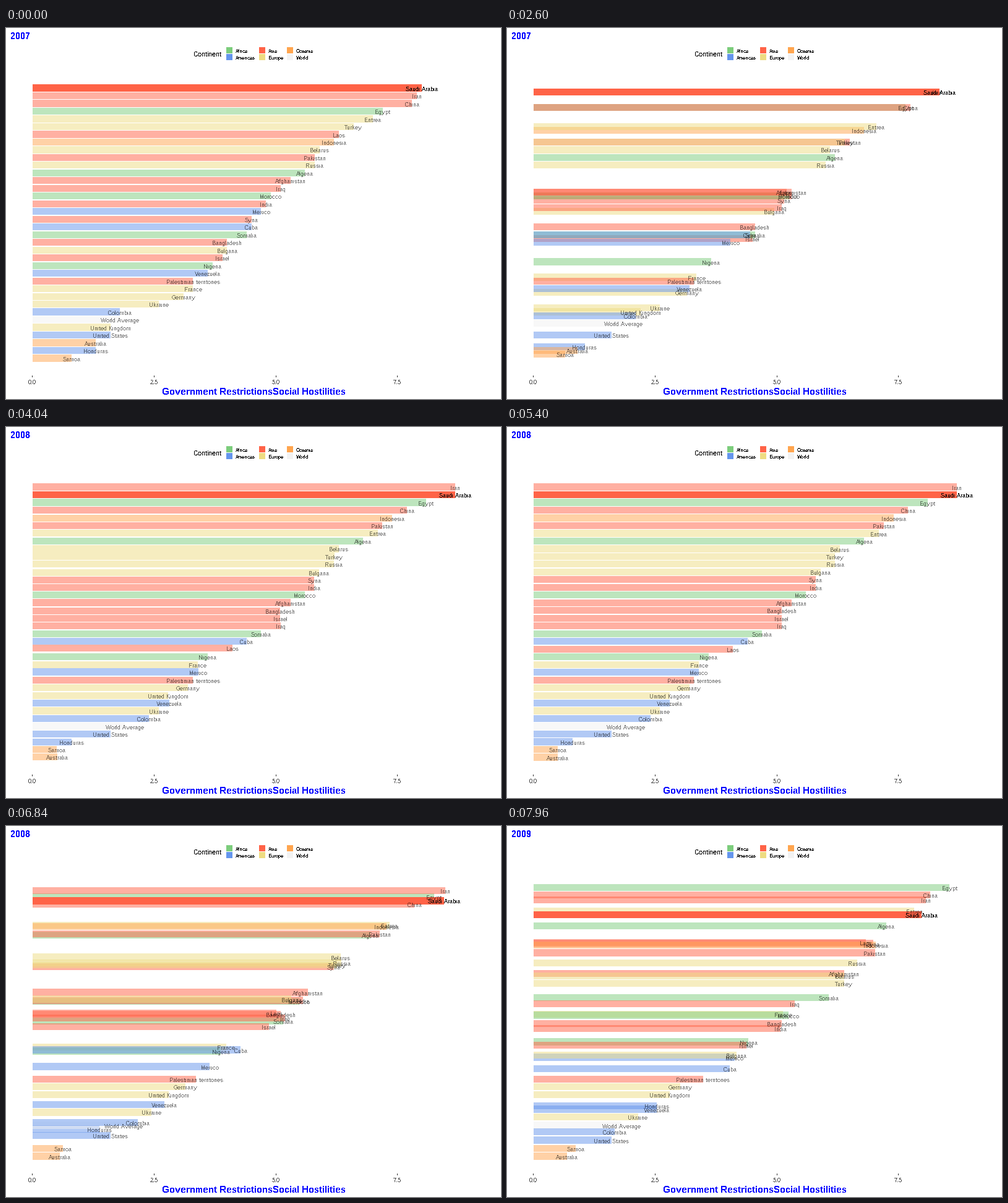
These frames come from a looping animation (800 by 600 pixels, 8 s). A matplotlib script:

```python
import matplotlib.pyplot as plt
from matplotlib.animation import FuncAnimation
from matplotlib.patches import Rectangle

plt.rcParams["font.family"] = "Liberation Sans"
plt.rcParams["text.hinting"] = "native"
plt.rcParams["text.hinting_factor"] = 1

W, H, FRAMES, STEP_MS = 800, 600, 200, 40
X0, UNIT = 43, 78.6          # value axis
Y1, ROW, BAR = 97, 12.486, 0.9  # rank axis
TWEEN = 95                   # length of a transition, in frames
MIDS = (65, 178.25)          # middle of each transition
FOCUS = "Saudi Arabia"

COLORS = {
    "Africa": "#7CCD7C", "Americas": "#6495ED", "Asia": "#FF6347",
    "Europe": "#EEDC82", "Oceania": "#FFA54F", "World": "#F2F2F2",
}

MEMBERS = {
    "Africa": "Egypt Algeria Morocco Somalia Nigeria",
    "Americas": "Mexico Cuba Venezuela Colombia United_States Honduras",
    "Asia": "Saudi_Arabia Iran China Laos Pakistan Afghanistan Iraq India "
            "Syria Bangladesh Israel Palestinian_territories",
    "Europe": "Eritrea Turkey Belarus Russia Bulgaria France Germany "
              "Ukraine United_Kingdom",
    "Oceania": "Indonesia Australia Samoa",
    "World": "World_Average",
}

# each year is listed in rank order
YEARS = {
    2007: {
        "Saudi Arabia": 8.0, "Iran": 7.9, "China": 7.8, "Egypt": 7.2,
        "Eritrea": 7.0, "Turkey": 6.6, "Laos": 6.3, "Indonesia": 6.2,
        "Belarus": 5.9, "Pakistan": 5.8, "Russia": 5.8, "Algeria": 5.6,
        "Afghanistan": 5.3, "Iraq": 5.1, "Morocco": 4.9, "India": 4.8,
        "Mexico": 4.7, "Syria": 4.5, "Cuba": 4.5, "Somalia": 4.4,
        "Bangladesh": 4.0, "Bulgaria": 4.0, "Israel": 3.9, "Nigeria": 3.7,
        "Venezuela": 3.6, "Palestinian territories": 3.3, "France": 3.3,
        "Germany": 3.1, "Ukraine": 2.6, "Colombia": 1.8,
        "World Average": 1.8, "United Kingdom": 1.6, "United States": 1.6,
        "Australia": 1.3, "Honduras": 1.3, "Samoa": 0.8,
    },
    2008: {
        "Iran": 8.7, "Saudi Arabia": 8.7, "Egypt": 8.1, "China": 7.7,
        "Indonesia": 7.4, "Pakistan": 7.2, "Eritrea": 7.1, "Algeria": 6.8,
        "Belarus": 6.3, "Turkey": 6.2, "Russia": 6.2, "Bulgaria": 5.9,
        "Syria": 5.8, "India": 5.8, "Morocco": 5.6, "Afghanistan": 5.3,
        "Bangladesh": 5.1, "Israel": 5.1, "Iraq": 5.1, "Somalia": 4.7,
        "Cuba": 4.4, "Laos": 4.1, "Nigeria": 3.6, "France": 3.4,
        "Mexico": 3.4, "Palestinian territories": 3.3, "Germany": 3.2,
        "United Kingdom": 2.8, "Venezuela": 2.8, "Ukraine": 2.6,
        "Colombia": 2.4, "World Average": 1.9, "United States": 1.6,
        "Honduras": 0.8, "Samoa": 0.5, "Australia": 0.5,
    },
    2009: {
        "Egypt": 8.6, "China": 8.2, "Iran": 8.0, "Eritrea": 7.9,
        "Saudi Arabia": 7.9, "Algeria": 7.3, "Laos": 7.1, "Syria": 7.1,
        "Indonesia": 7.0, "Pakistan": 7.0, "Russia": 6.7,
        "Afghanistan": 6.5, "Belarus": 6.4, "Turkey": 6.4, "Somalia": 6.2,
        "Iraq": 5.4, "France": 5.3, "Morocco": 5.2, "Bangladesh": 5.1,
        "India": 5.0, "Nigeria": 4.5, "Israel": 4.3, "Mexico": 4.2,
        "Bulgaria": 4.0, "Cuba": 4.0, "Palestinian territories": 3.5,
        "Germany": 3.0, "United Kingdom": 2.8, "Honduras": 2.7,
        "Venezuela": 2.5, "Ukraine": 2.1, "World Average": 1.8,
        "Colombia": 1.6, "United States": 1.6, "Samoa": 0.9,
        "Australia": 0.7,
    },
}
RANKS = {y: {n: i for i, n in enumerate(d)} for y, d in YEARS.items()}

fig = plt.figure(figsize=(W / 100, H / 100), dpi=100, facecolor="white")
ax = fig.add_axes([0, 0, 1, 1])
ax.set_xlim(0, W)
ax.set_ylim(H, 0)
ax.axis("off")


def text(x, y, s, px, ha="left", **kw):
    """Text on baseline y with its size in pixels."""
    return ax.text(x, y, s, fontsize=px * 0.72, ha=ha, va="baseline",
                   antialiased=False, **kw)


def rect(x, y, w, h, color, **kw):
    patch = Rectangle((x, y), w, h, facecolor=color, linewidth=0,
                      antialiased=False, **kw)
    return ax.add_patch(patch)


def cubic_in_out(p):
    p = min(max(p, 0), 1)
    return 4 * p ** 3 if p < 0.5 else 1 - 4 * (1 - p) ** 3


title = text(7, 18, "2007", 15, color="blue", weight="bold")
text(400.5, 593, "Government RestrictionsSocial Hostilities", 15, "center",
     color="blue", weight="bold")

text(304, 46, "Continent", 11, color="black")
for i, (name, color) in enumerate(COLORS.items()):
    x, y = (356, 409, 454)[i // 2], 31 + 11 * (i % 2)
    rect(x, y, 10, 10, color)
    text(x + 15, y + 9, name, 8, color="black")

for i in range(4):
    x = round(X0 + 2.5 * i * UNIT - 0.5)
    rect(x, 562, 1, 3, "#333333")
    text(x, 576, f"{2.5 * i:.1f}", 9, "center", color="#4D4D4D")

bars, labels = {}, {}
for continent, members in MEMBERS.items():
    for name in members.replace(" ", ",").replace("_", " ").split(","):
        alpha = 1 if name == FOCUS else 0.5
        bars[name] = rect(X0, 0, 1, 1, COLORS[continent], alpha=alpha)
        labels[name] = text(0, 0, name, 9, "center", color="black",
                            alpha=alpha)


def update(frame):
    k = 0 if frame < sum(MIDS) / 2 else 1
    a, b = 2007 + k, 2008 + k
    p = 0.5 + (frame - MIDS[k]) / TWEEN
    e = cubic_in_out(p)
    title.set_text(str(b if p > 0.5 else a))
    for name, bar in bars.items():
        value = YEARS[a][name] * (1 - e) + YEARS[b][name] * e
        rank = RANKS[a][name] * (1 - e) + RANKS[b][name] * e
        x, y = X0 + value * UNIT, Y1 + rank * ROW
        top = round(y - ROW * BAR / 2)
        bottom = round(y + ROW * BAR / 2)
        bar.set_bounds(X0, top, round(x) - X0, bottom - top)
        labels[name].set_position((x, round(y + 4.6)))
        # higher ranks are painted over lower ones
        z = 1 - RANKS[a][name] / 100
        bar.set_zorder(2 + z)
        labels[name].set_zorder(4 + z)
    return []


anim = FuncAnimation(fig, update, frames=FRAMES, interval=STEP_MS,
                     repeat=True, repeat_delay=0, blit=False)
plt.show()
```
